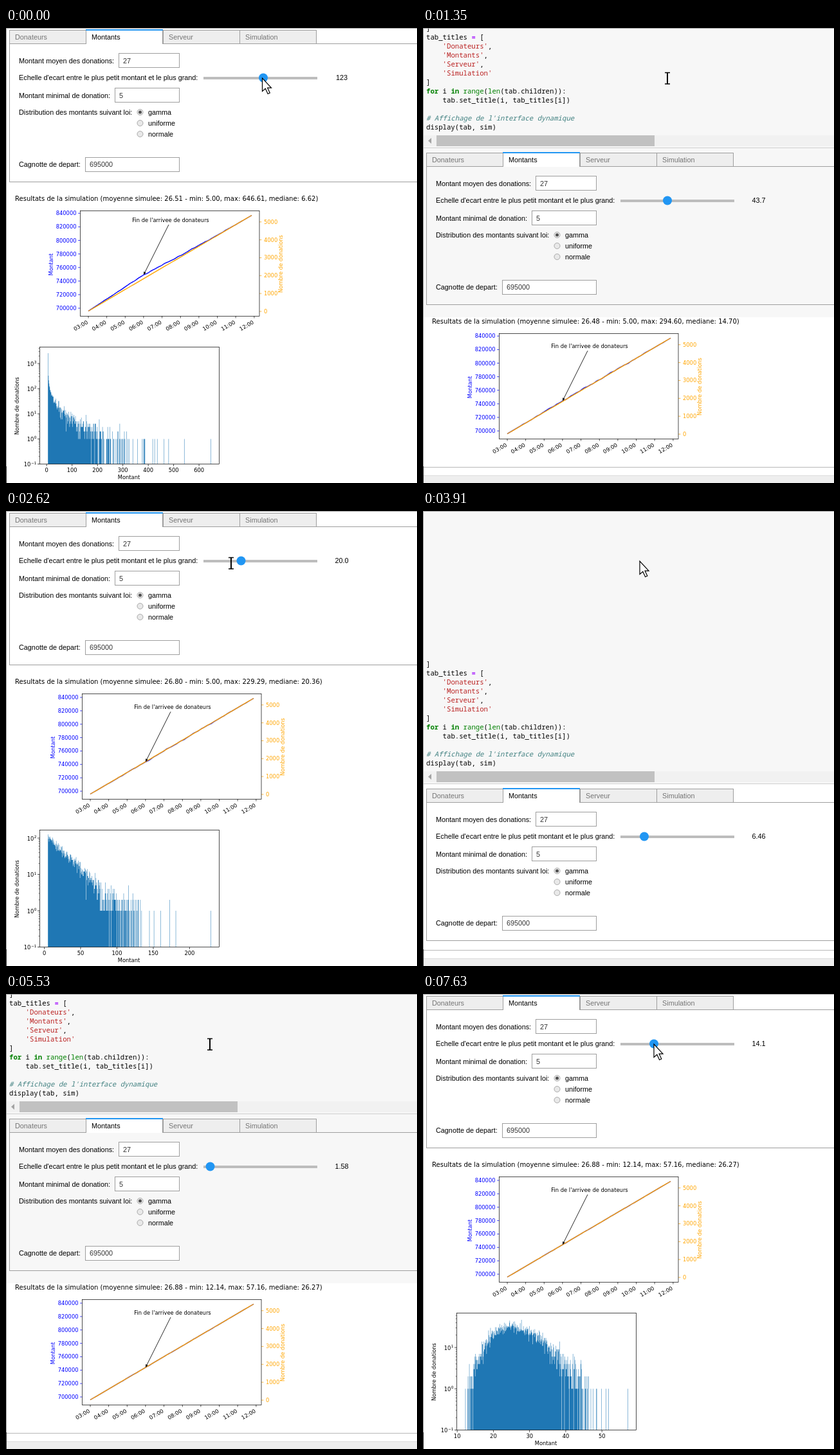
Animation of 639x708 px, one loop 8 s. Source, as an HTML page with a canvas:

```html
<!DOCTYPE html>
<html lang="fr">
<head>
<meta charset="utf-8">
<style>
  html, body { margin: 0; width: 100%; height: 100%; overflow: hidden; background: #fff; }
  canvas { display: block; }
</style>
</head>
<body>
<canvas width="639" height="708"></canvas>
<script>
const ctx = document.querySelector('canvas').getContext('2d');
const LOOP = 8000;
const SANS = '10.83px "Liberation Sans", Arial, sans-serif';
const PLOT = '8.33px "DejaVu Sans", sans-serif';
const PLOT_TITLE = '10.02px "DejaVu Sans", sans-serif';
const PLOT_SMALL = '5.83px "DejaVu Sans", sans-serif';
const MONO = '10.67px "Noto Sans Mono", monospace';
const BORDER = '#9e9e9e';
const SPINE = 0.7;

// One entry per simulation; k is the gamma shape, tail holds the rare large amounts.
const sims = [
  { mean: '26.51', min: 5, max: 646.61, median: '6.62', k: 0.19, cut: 390, tail: [418, 425, 435, 463, 481, 542],
    step: 100, decade: 39.1, dx: 0, tick: 21.1, bow: 6, jitter: 0.3 },
  { mean: '26.48', min: 5, max: 294.6, median: '14.70', k: 0.457, cut: 265, tail: [],
    step: 50, decade: 48, dx: 3, tick: 21.1, bow: 0.8, jitter: 0.4 },
  { mean: '26.80', min: 5, max: 229.29, median: '20.36', k: 1, cut: 135, tail: [144.7, 151, 160, 172.5, 172.6, 181],
    step: 50, decade: 56.5, dx: 3, tick: 20.85, bow: -0.3, jitter: 0.3 },
  { mean: '26.64', min: 6.43, max: 106.48, median: '24.46', k: 3.1, cut: 73, tail: [74.2, 76, 79.5, 80.2, 88, 90.5],
    step: 20, decade: 63.3, dx: 3, tick: 21, bow: 0.4, jitter: 0.2 },
  { mean: '26.88', min: 12.14, max: 57.16, median: '26.27', k: 12.66, cut: 46.4, tail: [46.9, 47.6, 48.5, 48.52, 49.9, 51.1, 51.8],
    step: 10, decade: 64.2, dx: 3, tick: 20.85, bow: 0, jitter: 0.1 },
];

// [start, simulation, scroll offset, chart visible, histogram visible]
const views = [
  [0, 0, 0, true, true],
  [990, 1, 429, false, false], [1020, 1, 191, true, false], [1440, 1, 0, true, true],
  [2270, 2, 0, true, false], [2330, 2, 0, true, true],
  [3910, 3, 429, false, false], [4030, 3, 191, true, false], [4180, 3, 0, true, true],
  [5450, 4, 429, false, false], [5530, 4, 191, true, false], [5840, 4, 0, true, true],
];
// [start, knob x, value]
const slider = [
  [0, 400, '123'], [780, 380, '43.7'], [1870, 365.5, '20.0'],
  [3550, 344, '6.46'], [5040, 317.5, '1.58'], [7630, 359, '14.1'],
];
// [time, x, y], linear in between
const pointer = [
  [0, 398.5, 78], [60, 398, 78], [500, 380, 78], [1440, 380, 78], [1820, 365.5, 78],
  [2380, 365.5, 78], [2620, 350, 81], [2760, 345, 82], [3070, 344, 82], [3300, 337, 78],
  [4220, 337, 78], [4270, 335.5, 78], [4520, 318, 78], [5040, 317, 78],
  [6810, 317, 78], [7360, 359, 78], [LOOP, 359, 78],
];
const textPointer = [[1350, 1440], [2560, 3070], [4030, 4180], [5530, 5840]];

const code = [
  ']', 'tab_titles = [', "    'Donateurs',", "    'Montants',", "    'Serveur',", "    'Simulation'", ']',
  'for i in range(len(tab.children)):', '    tab.set_title(i, tab_titles[i])', '',
  "# Affichage de l'interface dynamique", 'display(tab, sim)',
];

const latest = (list, t) => list.filter(entry => entry[0] <= t).pop();

function text(str, x, y, color = '#000', font = SANS, align = 'left') {
  ctx.font = font;
  ctx.fillStyle = color;
  ctx.textAlign = align;
  ctx.fillText(str, x, y);
}

function rotated(str, x, y, angle, color, align) {
  ctx.save();
  ctx.translate(x, y);
  ctx.rotate(angle);
  text(str, 0, 0, color, PLOT, align);
  ctx.restore();
}

function rect(x, y, w, h, color) {
  ctx.fillStyle = color;
  ctx.fillRect(x, y, w, h);
}

function frame(x, y, w, h, color, width = 1) {
  ctx.strokeStyle = color;
  ctx.lineWidth = width;
  ctx.strokeRect(x, y, w, h);
}

function line(points, color, width = 1) {
  ctx.beginPath();
  points.forEach(([x, y]) => ctx.lineTo(x, y));
  ctx.strokeStyle = color;
  ctx.lineWidth = width;
  ctx.stroke();
}

function disc(x, y, r, fill, stroke) {
  ctx.beginPath();
  ctx.arc(x, y, r, 0, 7);
  ctx.fillStyle = fill;
  ctx.fill();
  if (stroke) {
    ctx.strokeStyle = stroke;
    ctx.lineWidth = 1;
    ctx.stroke();
  }
}

function randomSource(seed) {
  return () => {
    seed = (Math.imul(seed, 1664525) + 1013904223) >>> 0;
    return (seed + 0.5) / 4294967296;
  };
}

function gamma(k, random) {
  if (k < 1) return gamma(k + 1, random) * random() ** (1 / k);
  const d = k - 1 / 3, c = 1 / Math.sqrt(9 * d);
  for (;;) {
    const n = Math.sqrt(-2 * Math.log(random())) * Math.cos(2 * Math.PI * random());
    const v = (1 + c * n) ** 3;
    if (v > 0 && Math.log(random()) < n * n / 2 + d - d * v + d * Math.log(v)) return d * v;
  }
}

const amountX = (sim, v) => 65.2 + (v - sim.min) / (sim.max - sim.min) * 253.3;
const countY = (sim, n) => 678.5 - sim.decade * (1 + Math.log10(n));

function histogramPath(sim, index) {
  const random = randomSource(77 + index), bins = new Array(500).fill(0);
  const add = v => bins[Math.min(499, Math.floor((v - sim.min) / (sim.max - sim.min) * 500))]++;
  for (let i = 0; i < 5380; i++) {
    const v = 5 + gamma(sim.k, random) * 22 / sim.k;
    if (v >= sim.min && v < sim.cut) add(v);
  }
  [...sim.tail, sim.max].forEach(add);
  const path = new Path2D(), width = 253.3 / 500;
  bins.forEach((n, i) => {
    if (n) path.rect(65.2 + i * width, countY(sim, n), width, 678.5 - countY(sim, n));
  });
  return path;
}
sims.forEach((sim, i) => { sim.bars = histogramPath(sim, i); });

function drawCode(bottom) {
  const shift = bottom - 186;
  rect(0, 0, 639, bottom, '#f7f7f7');
  code.forEach((source, row) => {
    const y = 4 + row * 14 + shift;
    for (const m of source.matchAll(/#.*|'.*?'|\w+|[^\w\s]/g)) {
      const s = m[0];
      let color = '#000', style = '';
      if (s[0] === '#') { color = '#408080'; style = 'italic '; }
      else if (s[0] === "'") color = '#ba2121';
      else if (/^(for|in)$/.test(s)) { color = '#008000'; style = 'bold '; }
      else if (/^(range|len)$/.test(s)) color = '#008000';
      else if (s === '=') { color = '#aa22ff'; style = 'bold '; }
      text(s, 5 + m.index * 6.4, y, color, style + MONO);
    }
  });
  rect(1, 167 + shift, 638, 17, '#f1f1f1');
  rect(21, 167 + shift, 339, 17, '#c1c1c1');
  ctx.beginPath();
  ctx.moveTo(8, 175.5 + shift);
  ctx.lineTo(13, 171 + shift);
  ctx.lineTo(13, 180 + shift);
  ctx.fillStyle = '#a3a3a3';
  ctx.fill();
  rect(1, bottom, 638, 1, '#cfcfcf');
}

function drawField(label, value, x, y, baseline) {
  text(label, 20, baseline);
  rect(x, y, 270 - x, 22, '#fff');
  frame(x + 0.5, y + 0.5, 269 - x, 22, BORDER);
  text(value, x + 7, baseline, '#333');
}

function drawPanel(knobX, value) {
  frame(5.5, 24.5, 700, 215, BORDER);
  ['Donateurs', 'Montants', 'Serveur', 'Simulation'].forEach((name, i) => {
    const x = 5 + Math.round(i * 119.3), active = i === 1;
    rect(x, 3, 119, active ? 22 : 21, active ? '#fff' : '#eee');
    frame(x + 0.5, 3.5, 119, 21, BORDER);
    if (active) rect(x + 1, 24, 118, 1, '#fff');
    text(name, x + 9, 18, active ? '#000' : '#757575');
  });
  rect(124, 2, 120, 2, '#2196f3');

  drawField('Montant moyen des donations:', '27', 175, 39, 55);
  drawField('Montant minimal de donation:', '5', 169, 93, 109);
  drawField('Cagnotte de depart:', '695000', 123, 201, 216);

  text("Echelle d'ecart entre le plus petit montant et le plus grand:", 20, 81);
  rect(307, 76, 177, 4, '#bdbdbd');
  disc(knobX, 77.5, 7, '#2196f3');
  text(value, 522, 81, '#000', SANS, 'center');

  text('Distribution des montants suivant loi:', 20, 135);
  ['gamma', 'uniforme', 'normale'].forEach((name, i) => {
    const y = 131 + i * 17;
    disc(208.5, y, 4.5, '#e9e9e9', '#a8a8a8');
    if (i === 0) disc(208.5, y, 2.5, '#505050');
    text(name, 221, y + 4);
  });
}

function drawChart(sim) {
  const { mean, min, max, median, dx, tick, bow, jitter } = sim;
  text(`Resultats de la simulation (moyenne simulee: ${mean} - min: ${min.toFixed(2)}, ` +
    `max: ${max.toFixed(2)}, mediane: ${median})`, 14, 269, '#000', PLOT_TITLE);
  ctx.save();
  ctx.translate(dx, 0);

  // The amount runs ahead until arrivals end at 06:00, then falls back to the trend.
  const base = t => 440.5 - 149 * t;
  const lead = t => Math.min(t / 0.34, ((1 - t) / 0.66) ** 2);
  const noise = t => Math.sin(Math.PI * t) * (Math.sin(31 * t) + Math.sin(83 * t) + 0.6 * Math.sin(151 * t));
  const donated = t => base(t) - bow * lead(t) - jitter * noise(t);
  const curve = f => Array.from({ length: 121 }, (_, i) => [128 + 254 * i / 120, f(i / 120)]);
  line(curve(donated), '#00f', 1.4);
  line(curve(base), '#ffa500', 1.4);

  for (let i = 0; i < 8; i++) {
    const y = 436 - i * tick;
    line([[112, y], [115.5, y]], '#00f', SPINE);
    text(700000 + i * 20000, 109.5, y + 3, '#00f', PLOT, 'right');
  }
  for (let i = 0; i < 6; i++) {
    const y = 441 - i * 27.85;
    line([[394, y], [397.5, y]], '#ffa500', SPINE);
    text(i * 1000, 401, y + 3, '#ffa500', PLOT);
  }
  for (let i = 0; i < 10; i++) {
    const x = 128 + i * 28.65;
    line([[x, 448], [x, 451.5]], '#000', SPINE);
    rotated(String(i + 3).padStart(2, '0') + ':00', x, 459.5, -Math.PI / 6, '#000', 'right');
  }
  frame(115.5, 284.5, 278.5, 164, '#000', SPINE);
  rotated('Montant', 73, 368, -Math.PI / 2, '#00f', 'center');
  rotated('Nombre de donations', 429.5, 367, -Math.PI / 2, '#ffa500', 'center');

  const tip = 390 - bow;
  text("Fin de l'arrivee de donateurs", 256, tip - 82, '#000', PLOT, 'center');
  line([[253, tip - 78], [214.5, tip - 1]], '#000', 0.85);
  ctx.beginPath();
  ctx.moveTo(214, tip);
  ctx.lineTo(214.2, tip - 5);
  ctx.lineTo(217.6, tip - 3.3);
  ctx.fillStyle = '#000';
  ctx.fill();
  ctx.restore();
}

function drawHistogram(sim) {
  ctx.fillStyle = '#1f77b4';
  ctx.fill(sim.bars);
  for (let v = 0; v < sim.max + sim.step; v += sim.step) {
    const x = amountX(sim, v);
    if (x < 52 || x > 331) continue;
    line([[x, 678.5], [x, 682]], '#000', SPINE);
    text(v, x, 690.5, '#000', PLOT, 'center');
  }
  for (let e = -1; e < 4; e++) {
    for (let m = 1; m < 10; m++) {
      const y = countY(sim, m * 10 ** e);
      if (y < 496) break;
      line([[m > 1 ? 50.5 : 49, y], [52.5, y]], '#000', m > 1 ? 0.5 : SPINE);
      if (m > 1) continue;
      const power = String(e).replace('-', '\u2212');
      text(power, 47.5, y, '#000', PLOT_SMALL, 'right');
      text('10', 47 - ctx.measureText(power).width, y + 3.5, '#000', PLOT, 'right');
    }
  }
  frame(52.5, 496.5, 279, 182, '#000', SPINE);
  text('Montant', 191, 702, '#000', PLOT, 'center');
  rotated('Nombre de donations', 19.5, 588, -Math.PI / 2, '#000', 'center');
}

function drawPointer(t) {
  const i = pointer.findIndex(p => p[0] > t);
  const [t0, x0, y0] = pointer[i - 1], [t1, x1, y1] = pointer[i];
  const f = (t - t0) / (t1 - t0);
  ctx.save();
  ctx.translate(x0 + (x1 - x0) * f, y0 + (y1 - y0) * f);
  if (textPointer.some(([from, to]) => t >= from && t < to)) {
    line([[0, -8], [0, 9]], '#000', 2);
    for (const y of [-8.5, 9]) line([[-4, y], [4, y]], '#000', 1.5);
  } else {
    const arrow = new Path2D('M0 0V20.5L4.8 16.3L8.6 24.5L11.8 23L8.1 15.2H14Z');
    ctx.fillStyle = '#fff';
    ctx.fill(arrow);
    ctx.strokeStyle = '#000';
    ctx.lineWidth = 1.2;
    ctx.stroke(arrow);
  }
  ctx.restore();
}

function draw(now) {
  const t = now % LOOP;
  const [, index, scroll, hasChart, hasHistogram] = latest(views, t);
  const [, knobX, value] = latest(slider, t);
  const sim = sims[index];
  rect(0, 0, 639, 708, '#fff');
  if (scroll) {
    if (hasChart) rect(0, 186, 639, 264, '#f7f7f7');
    drawCode(scroll - 5);
    rect(0, 683, 639, 1, '#b8b8b8');
    rect(0, 696, 639, 12, '#eee');
    rect(0, 696, 639, 1, '#ddd');
  }
  ctx.save();
  ctx.translate(0, scroll);
  drawPanel(knobX, value);
  if (hasChart) drawChart(sim);
  if (hasHistogram) drawHistogram(sim);
  ctx.restore();
  rect(0, 0, 639, 1, '#a0a0a0');
  rect(0, 0, 1, 708, '#a0a0a0');
  rect(0, 682, 1, 26, '#333');
  drawPointer(t);
  requestAnimationFrame(() => draw(performance.now()));
}
draw(performance.now());
</script>
</body>
</html>
```
